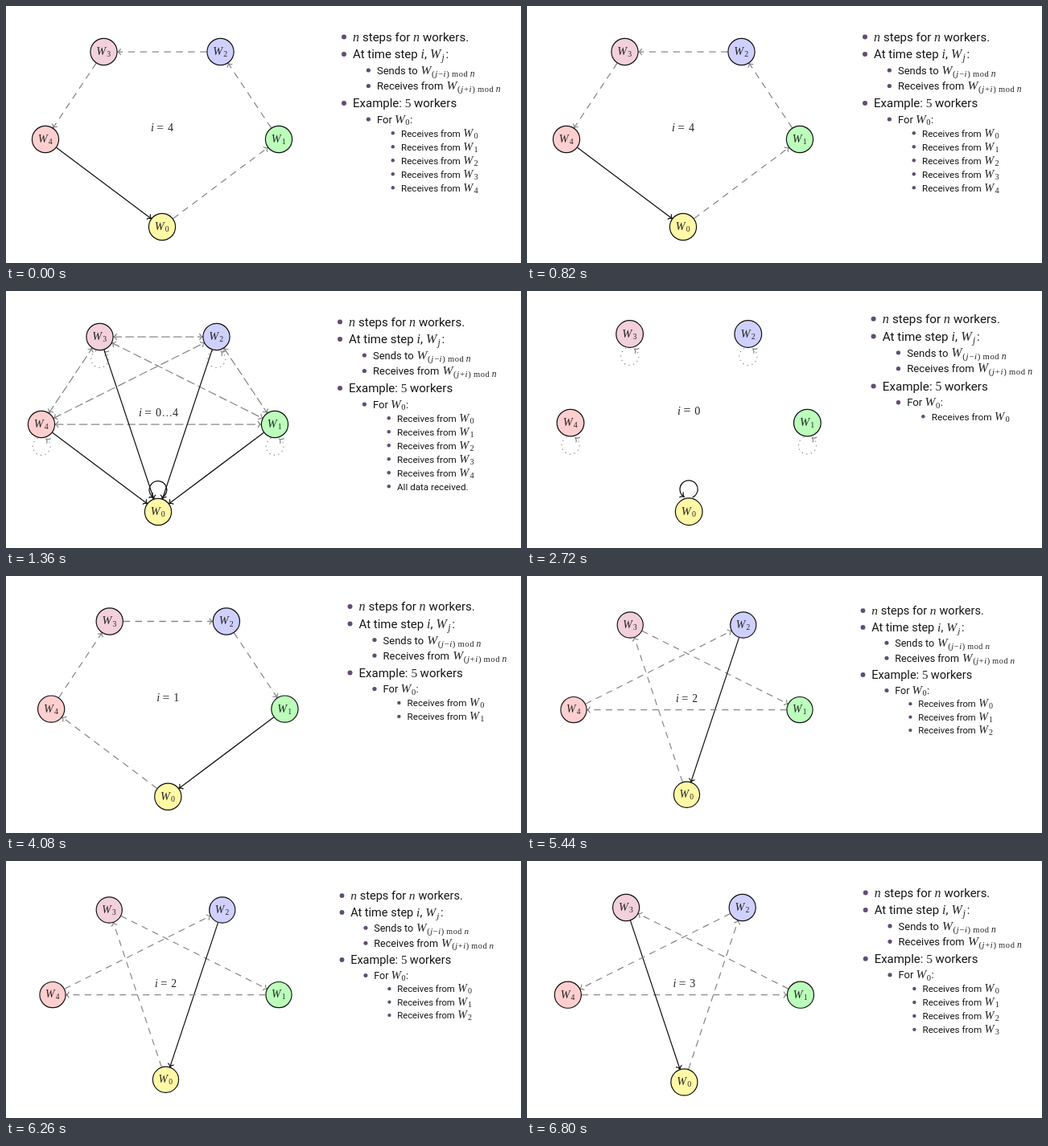
An HTML page for the animation above (8.16 s loop, 640 px wide and 320 px high).

```html
<!DOCTYPE html>
<html lang="en">
<head>
<meta charset="utf-8">
<title>Worker exchange</title>
<style>
  html, body { margin: 0; width: 100%; height: 100%; overflow: hidden; background: #fff; }
  svg { display: block; width: 100vw; height: 100vh; }
  text { fill: #151515; white-space: pre; }
  .sans { font-family: Roboto, sans-serif; }
  .math { font-family: "Liberation Serif", serif; fill: #262626; }
  .it { font-style: italic; }
  .sub { letter-spacing: 0.6px; }
  .edge { fill: none; stroke: #111; stroke-width: 1.25; }
  .grey { stroke: #888; }
</style>
</head>
<body>
<svg id="stage" viewBox="0 0 640 320"><g id="scene"></g></svg>
<script>
const HOLD = 1360, ALL = 5, R = 17;
const scene = document.getElementById('scene');

// Each slide: time step, diagram centre x, top row y, scale.
const slides = [
  [4, 194, 57, 1],
  [ALL, 189, 57, 1],
  [0, 201.2, 53.5, 1.015],
  [1, 201.3, 56.5, 1.001],
  [2, 198.5, 61, 0.969],
  [3, 195.4, 58, 0.997]
];

const nodes = [
  { x: 194, y: 275, fill: '#fff8a6' },
  { x: 339, y: 166, fill: '#bbffbb' },
  { x: 266.5, y: 57, fill: '#d0d0ff' },
  { x: 121.5, y: 57, fill: '#f2d0dc' },
  { x: 49, y: 166, fill: '#ffcfcf' }
];

const text = (x, y, size, str, cls) =>
  `<text x="${x}" y="${y}" font-size="${size}" class="${cls}">${str}</text>`;
const sans = (x, y, size, str) => text(x, y, size, str, 'sans');
const math = (x, y, size, str) => text(x, y, size, str, 'math');
const ital = (x, y, size, str) => text(x, y, size, str, 'math it');

const head = (x, y, angle, cls) =>
  `<path class="${cls}" transform="translate(${x} ${y}) rotate(${angle})"
    d="M-4 -4C-3.4 -1.6 -1 -.4 0 0C-1 .4 -3.4 1.6 -4 4"/>`;

function edge(from, to, both) {
  const a = nodes[from], b = nodes[to];
  const dx = b.x - a.x, dy = b.y - a.y, d = Math.hypot(dx, dy);
  const ux = dx / d * R, uy = dy / d * R;
  const angle = Math.atan2(dy, dx) * 180 / Math.PI;
  const cls = to ? 'edge grey' : 'edge';
  const dash = to ? `stroke-dasharray="${both ? '10.5 4.4' : '8.3 6.6'}"` : '';
  return `<path class="${cls}" ${dash} d="M${a.x + ux} ${a.y + uy}L${b.x - ux} ${b.y - uy}"/>`
    + head(b.x - ux, b.y - uy, angle, cls)
    + (both ? head(a.x + ux, a.y + uy, angle + 180, cls) : '');
}

// The loop sits above worker 0 and, dotted, below the others.
function loop(k) {
  const { x, y } = nodes[k];
  const cls = k ? 'edge grey' : 'edge';
  const dash = k ? 'stroke-dasharray="1.2 4.4"' : '';
  return `<g transform="translate(${x} ${y}) rotate(${k ? 180 : 0})">
    <path class="${cls}" ${dash} d="M4.5 -17.6A10.9 10.9 0 1 0 -6 -18.3"/>
    ${head(-6, -18.3, 38, cls)}</g>`;
}

function edges(step) {
  let out = '';
  if (step < ALL) {
    for (let j = ALL - 1; j >= 0; j--) {
      out += step ? edge(j, (j - step + ALL) % ALL) : loop(j);
    }
    return out;
  }
  for (let j = ALL - 1; j >= 0; j--) {
    out += loop(j);
    for (let k = 0; k < j; k++) out += edge(j, k, k > 0);
  }
  return out;
}

const node = (n, k) =>
  `<circle cx="${n.x}" cy="${n.y}" r="16.6" fill="${n.fill}" stroke="#111" stroke-width="1.2"/>`
  + ital(n.x - 9.2, n.y + 4, 14.2, 'W') + math(n.x + 3.8, n.y + 6, 9.8, k);

function stepLabel(step) {
  const all = step === ALL, x = all ? 165 + 5 : 180, y = 156;
  return ital(x, y, 14, 'i') + math(x + 7.3, y, 15.5, '=') + math(x + 21, y, 14, all ? 0 : step)
    + (all ? math(x + 28.5, y, 13.5, '…') + math(x + 42, y, 14, 4) : '');
}

const bullet = (level, y) =>
  `<circle cx="${420 + 30.4 * level}" cy="${y}" r="${3 - 0.4 * level}" fill="#624c74"/>`;

function target(x, y, sign) {
  const sub = `(<tspan class="it">j</tspan>${sign}<tspan class="it">i</tspan>)`;
  const low = y + 3;
  return ital(x, y, 15.5, 'W') + text(x + 13.5, low, 10.8, sub, 'math sub')
    + text(x + 38.3, low, 10.5, 'mod', 'math sub') + ital(x + 61.2, low, 11.5, 'n');
}

function notes(step) {
  let out = bullet(0, 38.5) + ital(431, 44, 16, 'n') + sans(443, 44, 15, 'steps for')
    + ital(506, 44, 16, 'n') + sans(518, 44, 15, 'workers.');
  out += bullet(0, 60) + sans(431, 65, 15, 'At time step') + ital(515.5, 65, 16, 'i')
    + sans(520, 65, 15, ',') + ital(527, 65, 16, 'W') + ital(541.5, 68, 11.5, 'j')
    + sans(546.5, 65, 15, ':');
  out += bullet(1, 80) + sans(461, 85, 13, 'Sends to') + target(515.6, 85, '−');
  out += bullet(1, 99.5) + sans(461, 104, 13, 'Receives from') + target(547.6, 104, '+');
  out += bullet(0, 121) + sans(431, 126, 15, 'Example:') + math(495.8, 126, 15.5, '5')
    + sans(507, 126, 15, 'workers');
  out += bullet(1, 141) + sans(461, 145.5, 13, 'For') + ital(483, 145.5, 15.3, 'W')
    + math(496.3, 148, 10.5, '0') + sans(502, 145.5, 13, ':');

  const count = Math.min(step, ALL - 1) + 1;
  for (let k = 0; k < count; k++) {
    const y = 162.5 + 17 * k;
    out += bullet(2, y - 4.2) + sans(491, y, 11.65, 'Receives from')
      + ital(568.3, y, 14.4, 'W') + math(581.5, y + 2, 10.3, k);
  }
  if (step === ALL) out += bullet(2, 243.3) + sans(491, 247.5, 11.65, 'All data received.');
  return out;
}

let shown = -1;
function draw(ms) {
  const index = Math.floor(ms / HOLD) % slides.length;
  if (index === shown) return;
  shown = index;
  const [step, cx, top, s] = slides[index];
  scene.setAttribute('transform', `translate(${cx - 194 * s} ${top - 57 * s}) scale(${s})`);
  scene.innerHTML = edges(step) + nodes.map(node).join('') + stepLabel(step) + notes(step);
}

const start = performance.now();
function tick() {
  draw(performance.now() - start);
  requestAnimationFrame(tick);
}
tick();
</script>
</body>
</html>
```
